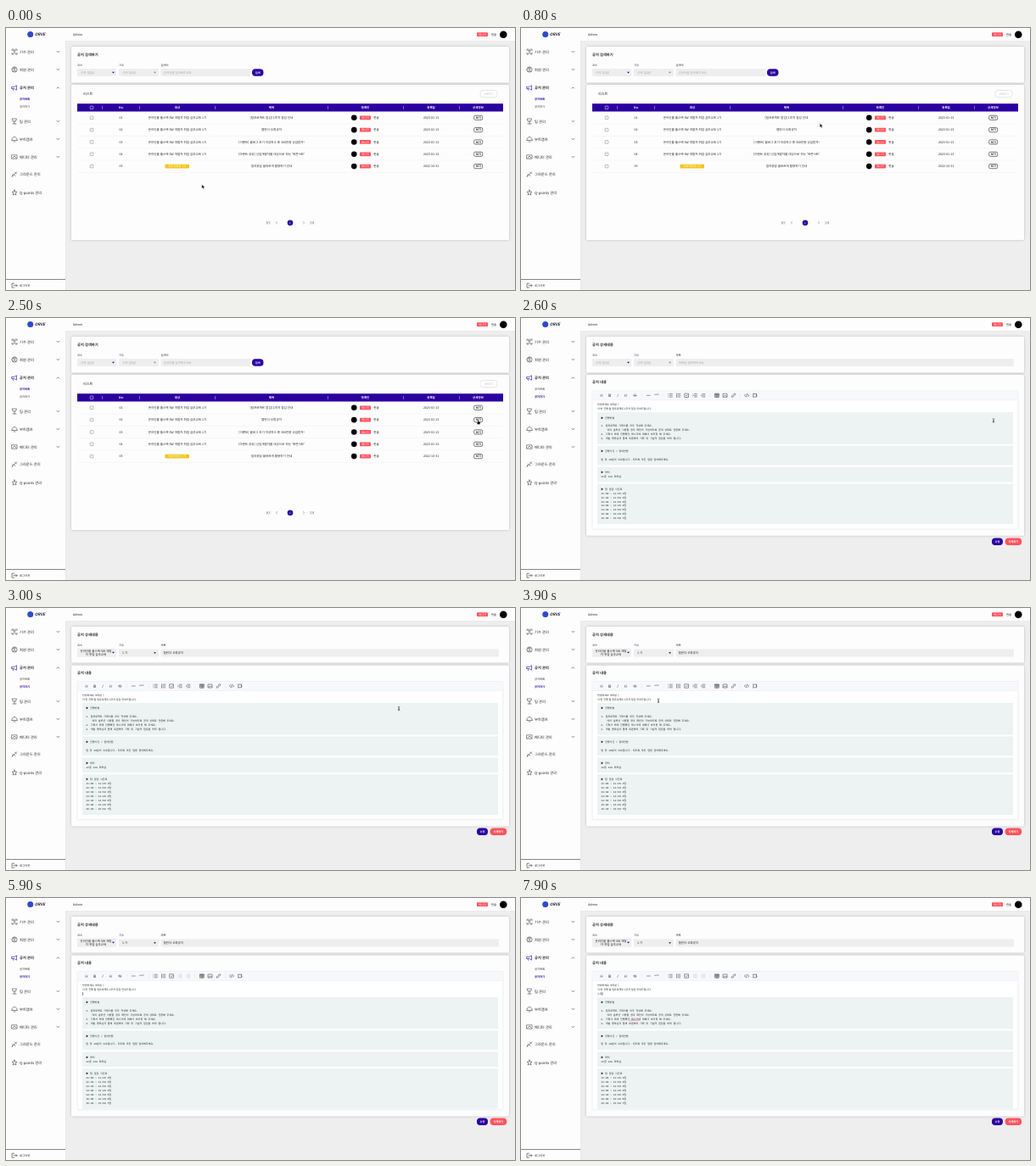
Recreate the animation shown at these times as an HTML page. Size 600 by 309 pixels, loop 8000 ms.

```html
<!DOCTYPE html>
<html lang="ko">
<head>
<meta charset="utf-8">
<style>
html, body { margin: 0; height: 100%; overflow: hidden; background: #eee; }
svg { display: block; width: 100%; height: 100%; }
text { font-family: "Noto Sans CJK KR", "Noto Sans", sans-serif; text-rendering: geometricPrecision; white-space: pre; }
.code { font-family: "Liberation Mono", "Noto Sans CJK KR", monospace; }
.card { fill: #fdfdfd; filter: drop-shadow(0 .5px 1.5px #0003); }
.line { fill: none; stroke: #333; stroke-width: .6; stroke-linecap: round; stroke-linejoin: round; }
</style>
</head>
<body>
<svg id="stage" viewBox="0 0 600 309" preserveAspectRatio="none"></svg>
<script>
const INDIGO = '#2b00a0', RED = '#ff545e', DARK = '#222', GRAY = '#aaa';
const COURSE = '온라인몰 풀스택 SW 개발자 취업 실무교육 1기';
const USER = '한솔';

// y is the vertical middle of the text
const text = (x, y, s, size = 3.55, fill = DARK, opt = '') =>
  `<text x="${x}" y="${y + size * .37}" font-size="${size}" fill="${fill}" ${opt}>${s}</text>`;
const MID = 'text-anchor="middle" ', BOLD = 'font-weight="700" ', MEDIUM = 'font-weight="500" ';
const mid = (x, y, s, size, fill, opt = '') => text(x, y, s, size, fill, MID + opt);
const box = (x, y, w, h, fill, r = 0, opt = '') =>
  `<rect x="${x}" y="${y}" width="${w}" height="${h}" rx="${r}" fill="${fill}" ${opt}/>`;
const dot = (x, y, r, fill) => `<circle cx="${x}" cy="${y}" r="${r}" fill="${fill}"/>`;
const path = (x, y, d, opt = '') => `<path class="line" transform="translate(${x} ${y})" d="${d}" ${opt}/>`;
const group = (id, body, opt = '') => `<g id="${id}" ${opt}>${body}</g>`;
const stroke = c => `style="stroke:${c}"`;
const card = (y, h) => box(77, y, 516, h, '#fdfdfd', 1.5, 'class="card"');
const arrow = (x, y, c) => `<path d="M${x - 1.5} ${y - .8}h3l-1.5 1.9z" fill="${c}"/>`;
const badge = (x, y) => box(x, y - 2.4, 13, 4.8, RED, .8) + mid(x + 6.5, y, '매니저', 3, '#fff', MEDIUM);
const pill = (x, y, w, s, fill) => box(x, y, w, 8.6, fill, 4) + mid(x + w / 2, y + 4.3, s, 3.2, '#fff', BOLD);
const field = (x, w, label, body, y = 48, h = 9) =>
  text(x, 44, label, 3.3) + box(x, y, w, h, '#eee', .8) + body;

function sidebar() {
  const person = 'M-1.2 -1.2a1.2 1.2 0 1 0 2.4 0a1.2 1.2 0 1 0 -2.4 0M-2 2.2q2-2.6 4 0';
  const items = [
    [28, '기수 관리', person + 'M-3-1.5V-3H-1.5M1.5-3H3V-1.5M3 1.5V3H1.5M-1.5 3H-3V1.5'],
    [49, '회원 관리', person + 'M-3.1 0a3.1 3.1 0 1 0 6.2 0a3.1 3.1 0 1 0 -6.2 0'],
    [70.5, '공지 관리', 'M-3-1H-.5L2.5-2.7V2.7L-.5 1H-3zM-2 1L-1.3 3'],
    [110, '팀 관리', 'M-2.5-3H2.5L1.5 0H-1.5zM0 0V3M-2 3H2'],
    [131, '부트캠프', 'M-3 1.5V-.5L0-3L3-.5V1.5M-3 1.5H3M-1 3H1'],
    [152, '메디터 관리', 'M-3-2.2H3V2.2H-3zM-2 1L0-1L2 1'],
    [172.5, '그라운드 관리', 'M-2.7 2.7L2.7-2.7M-1.5-.5L1 2M.5-2.5L2.5-.5M-2.7 2.7L-2 .5'],
    [194, 'Q-points 관리', 'M0-3L.8-.8L3-.7L1.3 .8L1.9 3L0 1.8L-1.9 3L-1.3 .8L-3-.7L-.8-.8z'],
  ];
  let s = box(0, 0, 70, 309, '#fdfdfd') + box(70, 15, .5, 294, '#e2e2e2');
  items.forEach(([y, label, icon], i) => {
    const on = i == 2;
    s += path(10, y, icon, stroke(on ? INDIGO : '#444')) + text(16, y, label, 4.25, DARK, on ? BOLD : '');
    if (i < 6) s += path(61.3, y, on ? 'M-1.3 .6L0-.7L1.3 .6' : 'M-1.3-.6L0 .7L1.3-.6');
  });
  return s + box(0, 296, 70, .7, '#555') +
    path(10, 303.7, 'M-.5-2.5H-3V2.5H-.5M-1 0H3M1.7-1.3L3 0L1.7 1.3') + text(16, 303.7, '로그아웃', 3.4);
}

const subMenu = (first, second) =>
  text(16, 84, '공지목록', 3.25, first ? INDIGO : DARK, first ? BOLD : '') +
  text(16, 92.6, '공지하기', 3.25, second ? INDIGO : DARK, second ? BOLD : '');

const topBar = () =>
  box(0, 0, 600, 15.3, '#fdfdfd') + box(70, 15.3, 530, .5, '#e0e0e0') +
  dot(28.7, 7.6, 3.5, '#2f49c8') + text(33.8, 7.6, 'ORVE', 4.6, '#223', BOLD + 'font-style="italic"') +
  text(79, 7.7, 'Admin', 3.7, DARK, MEDIUM) + badge(555, 7.7) +
  mid(575, 7.7, USER, 3.4) + dot(586.3, 7.7, 4.3, '#000');

const emptySelects = () =>
  field(84, 46, '코스', text(88, 52.6, '선택 (없음)', 3.5, GRAY) + arrow(126.5, 52.5, INDIGO)) +
  field(133, 47, '기수', text(137, 52.6, '선택 (없음)', 3.5, GRAY) + arrow(175.5, 52.5, '#888'));

function listPage() {
  const rows = [
    ['[팀프로젝트 점검] 1주차 점검 안내', '2023-01-13'],
    ['캘린더 오류공지', '2023-01-13'],
    ['[이벤트] 블로그 후기 작성하고 총 300만원 상금받자!', '2023-01-13'],
    ["[이벤트 공유] 신입개발자를 대상으로 하는 '북콘서트'", '2023-01-13'],
    ['질의응답 올바르게 활용하기 안내', '2022-10-31'],
  ];
  const heads = [[136, 'No.'], [202, '대상'], [313, '제목'], [423.5, '등록인'], [501, '등록일'], [556.5, '상세정보']];
  let s = subMenu(true, false) + card(22, 42.5) + text(84, 31.5, '공지 검색하기', 4.25, DARK, BOLD) + emptySelects() +
    field(182.5, 106, '검색어', text(185.5, 52.6, '검색어를 입력해주세요', 3.5, GRAY)) + pill(290, 48.2, 13.5, '검색', INDIGO) +
    card(67, 183) + text(91, 77.5, '리스트', 4.1, DARK, MEDIUM) +
    box(559, 73.5, 20, 8.2, '#fff', 3, 'stroke="#ccc" stroke-width=".5"') + mid(569, 77.6, '삭제하기', 3.2, '#bbb') +
    box(84, 89.2, 502, 9.3, INDIGO) + box(99.2, 92, 3.6, 3.6, 'none', .6, 'stroke="#fff" stroke-width=".5"');
  for (const x of [113, 157, 246, 379, 468, 534]) s += box(x, 92, .5, 3.8, '#d5ccee');
  for (const [x, label] of heads) s += mid(x, 93.9, label, 3.5, '#fff', BOLD);
  rows.forEach(([title, date], i) => {
    const y = 105.8 + i * 14.33;
    s += box(99.2, y - 1.8, 3.6, 3.6, '#fff', .6, 'stroke="#777" stroke-width=".5"') + mid(135.5, y, '0' + (i + 1)) +
      (i < 4 ? mid(202, y, COURSE) : box(187.5, y - 2.4, 28.5, 4.8, '#f4c61c', .8) + mid(201.8, y, '프로젝트반 1기', 3.3, '#fff')) +
      mid(313, y, title) + dot(410.3, y, 3.3, '#000') + badge(417, y) + mid(436.5, y, USER) + mid(501, y, date) +
      box(551.7, y - 2.6, 10, 5.2, '#fff', 1.5, `stroke="${DARK}" stroke-width=".6"`) + mid(556.7, y, '보기', 3.3, DARK, BOLD) +
      box(84, y + 7, 502, .4, '#ececec');
  });
  const page = (x, d) => path(x, 229.7, d, stroke('#888'));
  return s + page(309.5, 'M0-1.3L-1.5 0L0 1.3M2-1.3L.5 0L2 1.3M-2-1.3V1.3') + page(319, 'M.6-1.3L-.8 0L.6 1.3') +
    dot(335, 229.7, 3.3, INDIGO) + mid(335, 229.7, '1', 3.2, '#fff') +
    page(351, 'M-.6-1.3L.8 0L-.6 1.3') + page(360.5, 'M0-1.3L1.5 0L0 1.3M-2-1.3L-.5 0L-2 1.3M2-1.3V1.3');
}

function toolbar() {
  const glyph = (x, s, opt = '') => mid(x, 91.3, s, 4.6, '#555', opt);
  const icon = (x, d, opt) => path(x, 91.3, d, opt || stroke('#555'));
  const lines = 'M-.6-1.8H2.3M-.6 0H2.3M-.6 1.8H2.3';
  let s = glyph(95, 'H') + glyph(104.5, 'B', BOLD) + glyph(113.7, 'I', 'font-style="italic"') + glyph(123.3, 'H') + glyph(134.3, 'S') +
    icon(134.3, 'M-2 0H2') + icon(150.3, 'M-2 0H2') + glyph(160, '“”', BOLD) +
    icon(176, lines + 'M-2.2-1.8h.1M-2.2 0h.1M-2.2 1.8h.1') + icon(185.5, lines + 'M-2-2.3V-1.2M-2-.5V.5M-2 1.3V2.3') +
    icon(195.3, 'M-2.2-2.2H2.2V2.2H-2.2zM-1 0L-.2 .8L1.2-.8') +
    group('indents', icon(205, lines + 'M-2.4-.9L-1.4 0L-2.4 .9') + icon(214.6, lines + 'M-1.4-.9L-2.4 0L-1.4 .9')) +
    icon(231, 'M-2.2-2.2H2.2V2.2H-2.2zM-2.2-.8H2.2M-2.2-1.5H2.2M-2.2 .7H2.2M-.7-.8V2.2M.8-.8V2.2') +
    icon(240.7, 'M-2.3-2H2.3V2H-2.3zM-2 1.6L-.5-.2L.5 .8L1.2 .2L2 1.2') +
    icon(250.5, 'M-.6 .6L.6-.6M-.2-1.2L.8-2.2Q2.8-2.6 2.2-.8L1.2 .2M.2 1.2L-.8 2.2Q-2.8 2.6-2.2 .8L-1.2-.2') +
    icon(266, 'M-1.4-1.4L-2.7 0L-1.4 1.4M1.4-1.4L2.7 0L1.4 1.4M.5-1.8L-.5 1.8') +
    icon(276, 'M-2.2-1.8H1.5M-2.2 1.8H1.5V-1.8M-2.2-1.8V1.8M1.2-.5L2.4 .4L1.2 1.3');
  for (const x of [142.3, 168, 222.8, 258.3]) s += box(x, 89, .4, 4.8, '#ddd');
  return s;
}

function codeBlocks() {
  const clock = n => `${n >> 1}:${n % 2 ? '3' : '0'}0 ~ ${n >> 1}:${n % 2 ? '5' : '2'}0`;
  const blocks = [
    [111.2, 37.6, ['▶ 진행방법', '', '1. 팀프로젝트 기획서를 모두 작성해 주세요.', '    여러 솔루션 사용할 경우 확인이 가능하도록 공개 상태로 전환해 주세요.',
      '2. 기획서 외에 진행했던 테스크에 대해서 브리핑 해 주세요.', '3. 개발 멘토님과 함께 토론하며 기획 및 기술적 점검을 하게 됩니다.']],
    [150.7, 22.8, ['▶ 진행시간 / 참여인원', '', '팀 당 20분이 소요됩니다. 되도록 모든 팀원 참여해주세요.']],
    [175.7, 17.8, ['▶ 위치', '12층 12A 회의실']],
    [195.5, 47.7, ['▶ 팀 점검 시간표', ...[22, 23, 27, 28, 29, 30, 31].map((n, i) => `${clock(n)} ${i + 1}팀`)]],
  ];
  return blocks.map(([y, h, lines]) => box(90, y, 490, h, '#edf2f3') +
    lines.map((s, i) => text(94.3, y + 6.2 + i * 4.92, s, 3, DARK, 'class="code"')).join('')).join('');
}

function detailPage() {
  const body = text(90, 102.3, '안녕하세요 여러분 :)', 3) + text(90, 107.2, '이 번 진행 될 팀프로젝트 1주차 점검 안내드립니다.', 3) +
    `<text id="typed" x="90" y="113.4" font-size="3" fill="${DARK}"></text>` +
    group('blocks', codeBlocks() + group('spell', path(128.5, 138.6, 'M0 0H11', 'style="stroke:#e33;stroke-width:.4"'))) +
    box(0, 0, .5, 3.8, '#111', 0, 'id="caret"');
  return subMenu(false, true) + card(22, 42.5) + text(84, 31.7, '공지 상세내용', 4.25, DARK, BOLD) +
    group('empty', emptySelects() + field(182.5, 398.5, '제목', text(185.5, 52.6, '제목을 입력해주세요', 3.5, GRAY))) +
    group('filled',
      field(84, 46, '코스', mid(106, 50.4, COURSE.slice(0, 14), 3.5) + mid(106, 55.1, COURSE.slice(14, -3), 3.5) + arrow(126.5, 52.5, INDIGO), 47.5, 10.3) +
      field(133, 47, '기수', text(137, 53, '1 기', 3.5) + arrow(175.5, 53, DARK), 48.5) +
      field(182.5, 398.5, '제목', text(185.5, 53, '캘린더 오류공지', 3.5), 48.5)) +
    group('editor', card(67, 189.7) + text(84, 75.7, '공지 내용', 4.25, DARK, BOLD) +
      box(84, 86, 502, 163, '#fff', 1, 'stroke="#dadde6" stroke-width=".5"') +
      box(84.3, 86.3, 501.4, 10.4, '#f6f8fb') + box(84, 96.7, 502, .4, '#e4e7ee') + toolbar() +
      `<clipPath id="view"><rect x="84" y="97" width="502" height="151"/></clipPath>` + group('content', body, 'clip-path="url(#view)"')) +
    pill(555, 259.5, 13, '수정', INDIGO) + pill(570.6, 259.5, 19.6, '삭제하기', RED);
}

const pointers =
  group('arrow', '<path d="M0 0V4.7L1.1 3.7L1.9 5.5L2.8 5.1L2 3.4H3.5z" fill="#000" stroke="#fff" stroke-width=".4"/>') +
  group('hand', '<path d="M-.5 0Q0-.6 .5 0V1.8L2.6 2.4V4L2 5.4H-.6L-2 3.2L-1.5 2.8L-.5 3.4z" fill="#000" stroke="#fff" stroke-width=".4"/>') +
  group('beam', '<path class="line" d="M-.8-2.2Q0-2.2 0-1.6V1.6Q0 2.2-.8 2.2M.8-2.2Q0-2.2 0-1.6M0 1.6Q0 2.2 .8 2.2M-.6 .6H.6"/>');

const $ = id => document.getElementById(id);
$('stage').innerHTML = box(0, 0, 600, 309, '#eee') + sidebar() + topBar() +
  group('list', listPage()) + group('detail', detailPage()) + group('mouse', pointers);

const route = [[0, 230.8, 184.6], [500, 426, 107], [800, 352.3, 112.6], [1000, 352.3, 112.6], [1800, 541, 117],
  [2300, 556.5, 120], [2500, 556.5, 120], [2600, 557, 121], [2700, 557, 121], [3600, 195, 112], [3900, 162, 109.3], [4200, 158, 109]];
const keys = [[6000, 'ㅅ'], [6200, '수'], [6500, '숮'], [6900, '수저'], [7100, '수정']];
const hidden = [[4500, 4900], [5500, 5900], [7400, 7900]];

function mouseAt(t) {
  const i = route.findIndex(p => p[0] > t);
  if (i < 0) return route.at(-1).slice(1);
  const [a, b] = [route[i - 1], route[i]];
  const u = (t - a[0]) / (b[0] - a[0]), e = u * u * (3 - 2 * u);
  return [1, 2].map(k => a[k] + (b[k] - a[k]) * e);
}

const show = (id, on) => $(id).style.display = on ? '' : 'none';
const move = (id, x, y) => $(id).setAttribute('transform', `translate(${x} ${y})`);

function frame() {
  const t = Math.floor(performance.now() % 8000 / 100) * 100;
  const open = t >= 2600, filled = t >= 2700, newLine = t >= 4900;
  const word = keys.filter(k => k[0] <= t).at(-1)?.[1] ?? '';
  show('list', !open);
  show('detail', open);
  show('empty', !filled);
  show('filled', filled);
  move('editor', 0, filled ? .7 : 0);
  move('blocks', 0, newLine ? 4.95 : 0);
  $('indents').style.opacity = t >= 4100 ? .3 : 1;
  show('spell', t >= 6200);
  $('typed').textContent = word;
  show('caret', t >= 4100 && !hidden.some(([a, b]) => t >= a && t < b));
  move('caret', newLine ? 90 + word.length * 2.85 : 152, newLine ? 110.4 : 105.6);
  show('mouse', !newLine);
  move('mouse', ...mouseAt(t));
  show('arrow', t < 2200);
  show('hand', t >= 2200 && !open);
  show('beam', open);
  requestAnimationFrame(frame);
}
frame();
</script>
</body>
</html>
```
